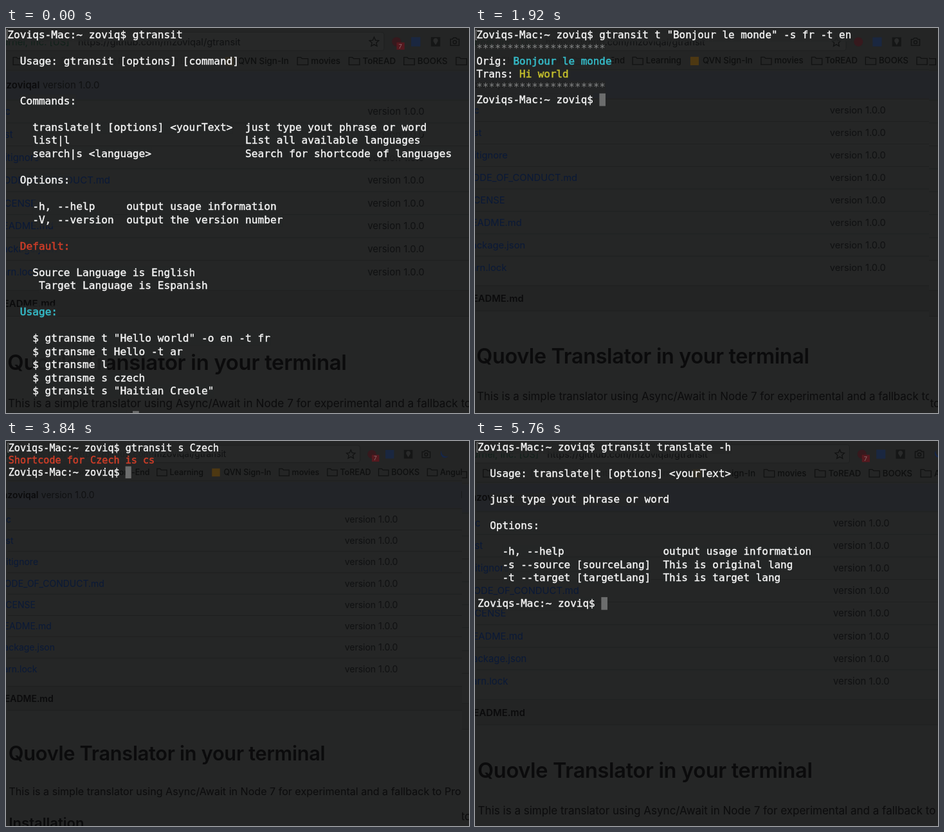
Write an HTML page that moves like this. It is 720x599 px and loops after 6.72 s.

```html
<!DOCTYPE html>
<html lang="en">
<head>
<meta charset="utf-8">
<title>Terminal translator</title>
<style>
  html, body { margin: 0; width: 100%; height: 100%; overflow: hidden; background: #252626; }
  #stage { display: block; width: 720px; height: 599px; }
  text { white-space: pre; }

  .scene + .scene { opacity: 0; animation: show 6720ms step-end infinite; }
  @keyframes show {
    0% { opacity: 1; }
    14.28572%, 100% { opacity: 0; }
  }

  .page { font-family: Inter, "Open Sans", sans-serif; font-size: 14.6px; fill: #101112; }
  .page .small { font-size: 13px; font-weight: 500; fill: #0e0f0f; }
  .page .url { font-size: 14.3px; }
  .page .secure { fill: #11211a; text-anchor: end; }
  .page .link { fill: #0a1937; }
  .page .bold { font-weight: 600; fill: #0b0b0c; }
  .page .title { font-size: 32px; letter-spacing: -.3px; }
  .page .sub { font-size: 23px; }
  .page .para { font-size: 16.75px; fill: #0c0c0d; }
  .line { fill: none; stroke: #1f2020; }
  .icon { fill: none; stroke: #111212; stroke-width: 1.3; }

  .term { font: 15.74px "DejaVu Sans Mono", "Liberation Mono", monospace; fill: #f6f6f6; stroke: #f6f6f6; stroke-width: .4px; }
  .term .c { fill: #35bbc8; stroke: #35bbc8; stroke-width: .55px; }
  .term .y { fill: #c3be2c; stroke: #c3be2c; stroke-width: .55px; }
  .term .r { fill: #cb3d28; stroke: #cb3d28; stroke-width: .55px; }
  .term .g { fill: #858686; stroke: none; }
  .cell { fill: #252626; fill-opacity: .75; stroke: none; }
  .cursor { fill: #6c6d6d; stroke: none; }
  .mark { fill: none; stroke: #8a8a8a; stroke-width: 1; }
</style>
</head>
<body>
<svg id="stage" viewBox="0 0 720 599" xmlns="http://www.w3.org/2000/svg"></svg>
<script>
const STEP = 960, COUNT = 7;
const CELL = 9.475, LEAD = 19.95, BASE = 16.9, LEFT = 1.3;
const PROMPT = 'Zoviqs-Mac:~ zoviq$ ';
const STARS = '{g ' + '*'.repeat(21) + '}';

const esc = s => s.replace(/&/g, '&amp;').replace(/</g, '&lt;').replace(/>/g, '&gt;');
const text = (x, y, s, cls = '') => `<text x="${x}" y="${y}" class="${cls}">${esc(s)}</text>`;
const rect = (x, y, w, h, fill) => `<rect x="${x}" y="${y}" width="${w}" height="${h}" fill="${fill}"/>`;
const rule = y => `<path class="line" d="M0 ${y}H760"/>`;
const folder = x => `<path class="icon" d="M${x} 45.5h5l2 2h9v9.5h-16z"/>`;

// Browser window seen through the terminal
function page(badge) {
  const marks = [[10, 'OTHER'], [84, 'Tools'], [148, 'Front-End'], [242, 'Learning'], [440, 'movies'],
    [518, 'ToREAD'], [601, 'BOOKS'], [680, 'Angular']];
  const files = ['src', 'dist', '.gitignore', 'CODE_OF_CONDUCT.md', 'LICENSE', 'README.md', 'package.json', 'yarn.lock'];
  return [
    rect(0, 0, 760, 65, '#242525'),
    '<rect class="line" x="-20" y="7.5" width="591" height="28" rx="4" style="fill:#272828"/>',
    rule(65),
    text(95, 27, 'Vurnel, Inc. [US]', 'url secure'),
    text(108, 27, 'https://github.com/mzoviqal/gtransit', 'url'),
    '<path class="icon" d="M556 15l2.1 4.7 5 .5-3.8 3.4 1.1 5-4.4-2.6-4.4 2.6 1.1-5-3.8-3.4 5-.5z"/>',
    '<circle cx="590" cy="22" r="7" fill="#36191d"/>',
    badge ? rect(590, 23, 12, 11, '#56191f') + '<text x="593" y="32" style="font-size:9px;fill:#8d6b6e">7</text>' : '',
    rect(612, 15, 14, 14, '#1a2740'),
    rect(642, 15, 14, 14, '#151616'),
    '<path d="M649 27l-3.5-6a3.6 3.6 0 1 1 7 0z" fill="#292a2a"/>',
    '<path class="icon" d="M671.5 18h3l1.5-2h4l1.5 2h3v9.5h-13z"/><circle class="icon" cx="678" cy="22.5" r="2.5"/>',
    '<path d="M703 16a7 7 0 1 0 11 9a8 8 0 0 1-11-9z" fill="#15264a"/>',
    ...marks.map(([x, s]) => folder(x) + text(x + 20.5, 55.6, s, 'small')),
    rect(331, 45, 13, 13, '#4d3812'),
    text(350, 55.6, 'QVN Sign-In', 'small'),
    rect(0, 67, 760, 42, '#222428'),
    '<text x="50" y="93" class="bold" text-anchor="end">mzoviqal</text>',
    text(54.5, 93, 'version 1.0.0'),
    text(734, 93, 'Latest commit'),
    ...files.map((s, i) => {
      const y = 127.5 + i * 34.62;
      return rule(y - 17.3) + text(-15.5, y + 5.2, s, 'link') + text(546, y + 5.2, 'version 1.0.0');
    }),
    rect(0, 398, 760, 39, '#232424'), rule(398), rule(437),
    text(-14.5, 423.2, 'README.md', 'bold'),
    text(1.4, 518, 'Quovle Translator in your terminal', 'bold title'),
    text(2, 574.3, 'This is a simple translator using Async/Await in Node 7 for experimental and a fallback to Promise', 'para'),
    text(2, 628, 'Installation', 'bold sub'),
  ].join('');
}

const MARKUP = /\{(\w) (.*?)\}/g;

// Written cells hide most of the page behind them
function backing(s, y) {
  const runs = s.replace(MARKUP, '$2').matchAll(/\S+( \S+)*/g);
  return [...runs].map(m => `<rect class="cell" x="${LEFT + m.index * CELL}" y="${y - 15.2}"
    width="${m[0].length * CELL}" height="${LEAD}"/>`).join('');
}

// "{c words}" colours a run of words
function terminal(lines) {
  let out = '';
  lines.forEach((s, i) => {
    const y = BASE + i * LEAD;
    out += backing(s, y);
    if (s === PROMPT) out += `<rect class="cursor" x="${LEFT + 20 * CELL}" y="${y - 15.2}" width="${CELL}" height="19.5"/>`;
    else if (s.startsWith(PROMPT)) out += `<path class="mark" d="M2 ${y - 13}H.5v15H2"/>`;
    const runs = esc(s).replace(MARKUP, '<tspan class="$1">$2</tspan>');
    if (s) out += `<text x="${LEFT}" y="${y}">${runs}</text>`;
  });
  return out;
}

const languages = `af Afrikaans,ak Akan,sq Albanian,am Amharic,ar Arabic,hy Armenian,az Azerbaijani,eu Basque,be Belarusian,
bem Bemba,bn Bengali,bh Bihari,bs Bosnian,br Breton,bg Bulgarian,km Cambodian,ca Catalan,chr Cherokee,ny Chichewa,
zh-CN Chinese (Simplified),zh-TW Chinese (Traditional),co Corsican,hr Croatian,cs Czech,da Danish,nl Dutch,en English,
eo Esperanto,et Estonian`.split(/,\s*/).map(s => s.replace(/^(\S+) (.*)$/, 'Shortcode: {y $1}  ,  Language:  {c $2}'));

const entry = (a, b, col) => ('    ' + a).padEnd(col) + b;
const talk = (cmd, from, to) =>
  [PROMPT + cmd, STARS, `Orig: {c ${from}}`, `Trans: {y ${to}}`, STARS, PROMPT];
const czech = [PROMPT + 'gtransit s Czech', '{r Shortcode for Czech is cs}'];

const help = [
  PROMPT + 'gtransit', '',
  '  Usage: gtransit [options] [command]', '', '',
  '  Commands:', '',
  entry('translate|t [options] <yourText>', 'just type yout phrase or word', 38),
  entry('list|l', 'List all available languages', 38),
  entry('search|s <language>', 'Search for shortcode of languages', 38), '',
  '  Options:', '',
  entry('-h, --help', 'output usage information', 19),
  entry('-V, --version', 'output the version number', 19), '',
  '  {r Default:}', '',
  '    Source Language is English',
  '     Target Language is Espanish', '',
  '  {c Usage:}', '',
  '    $ gtransme t "Hello world" -o en -t fr',
  '    $ gtransme t Hello -t ar',
  '    $ gtransme l',
  '    $ gtransme s czech',
  '    $ gtransit s "Haitian Creole"', '',
  PROMPT,
];

const subHelp = [
  PROMPT + 'gtransit translate -h', '',
  '  Usage: translate|t [options] <yourText>', '',
  '  just type yout phrase or word', '',
  '  Options:', '',
  entry('-h, --help', 'output usage information', 30),
  entry('-s --source [sourceLang]', 'This is original lang', 30),
  entry('-t --target [targetLang]', 'This is target lang', 30), '',
  PROMPT,
];

// Each shot has its own zoom, offset and visible width
const scenes = [
  { w: 720, zx: 1.028, zy: 1.029, x: .9, y: -1.2, badge: true, lines: help },
  { w: 706, zx: 1, zy: 1, x: 0, y: 0, lines: talk('gtransit t "hello world" -t fr', 'hello world', 'Bonjour le monde') },
  { w: 706, zx: 1.009, zy: 1.009, x: .9, y: -.6, lines: talk('gtransit t "Bonjour le monde" -s fr -t en', 'Bonjour le monde', 'Hi world') },
  { w: 706, zx: 1, zy: 1.003, x: 0, y: 0, badge: true, lines: [PROMPT + 'gtransit l', ...languages] },
  { w: 709, zx: .96, zy: .96, x: 2.5, y: -.5, badge: true, lines: [...czech, PROMPT] },
  { w: 712, zx: 1.049, zy: 1.05, x: 1.1, y: -1, badge: true, lines: [...czech,
    PROMPT + 'gtransit s "Chinese (Traditional)"', '{r Shortcode for Chinese (Traditional) is zh-TW}', PROMPT] },
  { w: 720, zx: 1.0155, zy: 1.015, x: 2.6, y: -1.8, badge: true, lines: subHelp },
];

document.getElementById('stage').innerHTML = scenes.map((s, i) => `
  <g class="scene" style="animation-delay:${(i - COUNT) * STEP}ms"><svg width="${s.w}" height="599">
    ${rect(0, 0, 720, 599, '#252626')}
    <g transform="matrix(${s.zx} 0 0 ${s.zy} ${s.x} ${s.y})">
      <g class="page">${page(s.badge)}</g>
      <g class="term">${terminal(s.lines)}</g>
    </g>
  </svg></g>`).join('');
</script>
</body>
</html>
```
